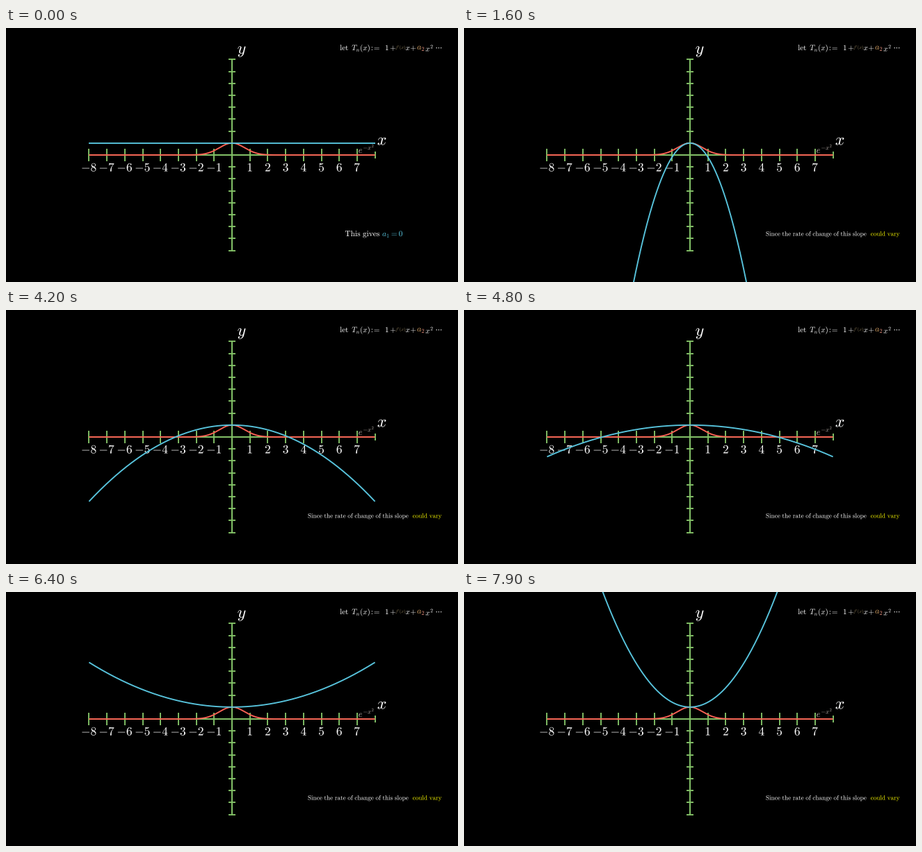
Recreate the animation shown at these times as a matplotlib script. Size 650 px wide and 366 px high, loop 8000 ms.

```python
import numpy as np
import matplotlib.pyplot as plt
from matplotlib.animation import FuncAnimation
from matplotlib.colors import to_rgb
from matplotlib.patches import PathPatch
from matplotlib.path import Path
from matplotlib.textpath import TextPath
from matplotlib.transforms import Affine2D

plt.rcParams["mathtext.fontset"] = "cm"

W, H, DPI = 650, 366, 100
STEP, FRAMES = 100, 80
PT = 72 / DPI
CX, CY, UX, UY = 325, 183, 25.7, 17.2

GREEN, RED, BLUE = "#83C167", "#FC6255", "#58C4DD"
WHITE, YELLOW = "#FFFFFF", "#FFFF00"

fig = plt.figure(figsize=(W / DPI, H / DPI), dpi=DPI, facecolor="black")
ax = fig.add_axes([0, 0, 1, 1])
ax.set_xlim(0, W)
ax.set_ylim(H, 0)
ax.axis("off")


def line(x, y, color, width=1.9, z=1):
    return ax.plot(x, y, color=color, lw=width * PT, zorder=z,
                   solid_capstyle="butt", solid_joinstyle="round")[0]


def glyphs(tex, size, x, base, center=False):
    """Outline of a formula with its ink starting (or centred) at x."""
    path = TextPath((0, 0), f"${tex}$", size=size)
    box = path.get_extents()
    anchor = (box.x0 + box.x1) / 2 if center else box.x0
    return path.transformed(Affine2D().translate(-anchor, 0).scale(1, -1).translate(x, base))


def write(tex, size, x, base, color=WHITE, center=False):
    ax.add_patch(PathPatch(glyphs(tex, size, x, base, center), fc=color, lw=0, zorder=2))


# Axes
def draw_axes():
    line([CX - 8 * UX, CX + 8 * UX], [CY, CY], GREEN, 2)
    line([CX, CX], [CY - 8 * UY, CY + 8 * UY], GREEN, 2)
    for n in range(-8, 9):
        x, y = CX + n * UX, CY + n * UY
        half = 5 if n == 8 else 9
        line([x, x], [CY - half, CY + half], GREEN)
        line([CX - 4.8, CX + 4.8], [y, y], GREEN)
        if n and n < 8:
            write(str(n), 17.5, x, 206.5, center=True)
    write("x", 24, 534.5, 168.5)
    write("y", 24, 333.3, 37)


def draw_formula():
    write(r"\mathrm{let}", 11, 480.5, 32)
    write("T_n(x)", 11, 497.5, 32)
    write(":", 11, 525.8, 32)
    write("=", 11, 529.5, 32)
    write("1", 11, 546, 32)
    write("+", 11, 552.8, 32)
    write("f'(x)", 6.5, 560.5, 30, "#8C7C58")
    write("x", 11, 575, 32)
    write("+", 11, 582, 32)
    write("a", 12, 591.5, 31, "#D9A566")
    write("2", 8.5, 597.8, 33, "#EE9482")
    write("x^2", 11, 603.5, 33.5)
    write(r"\cdots", 11, 618.5, 31.5)


draw_axes()
draw_formula()
write("e^{-x^2}", 12.5, 507.3, 180, "#C4BAB4")

xs = np.linspace(-8, 8, 401)
px = CX + UX * xs
line(px, CY - UY * np.exp(-xs ** 2), RED, z=3)
curve = line(px, CY - UY + 0 * xs, BLUE, z=4)


# Motion
def smooth(t):
    t = np.clip(t, 0, 1)
    sig = lambda v: 1 / (1 + np.exp(-v))
    low = sig(-5)
    return float(np.clip((sig(10 * (t - 0.5)) - low) / (1 - 2 * low), 0, 1))


BENDS = [0, -2, -0.1, 0, 0.1, 1]
TEXT_START, BEND_START, PERIOD, RUN = 66, 1066, 1600, 1000


def bend(ms):
    a = BENDS[0]
    for i, (old, new) in enumerate(zip(BENDS, BENDS[1:])):
        a += (new - old) * smooth((ms - BEND_START - i * PERIOD) / RUN)
    return a


# Caption morph
def resample(poly, n=80):
    dist = np.r_[0, np.cumsum(np.hypot(*np.diff(poly, axis=0).T))]
    u = np.linspace(0, dist[-1], n)
    return np.c_[np.interp(u, dist, poly[:, 0]), np.interp(u, dist, poly[:, 1])]


def split(path):
    """Group contours that overlap horizontally into single letters."""
    letters, right = [], -1
    for poly in path.to_polygons(Affine2D().scale(10)):
        poly = resample(np.asarray(poly) / 10)
        lo, hi = poly[:, 0].min(), poly[:, 0].max()
        if letters and (lo + hi) / 2 < right:
            letters[-1].append(poly)
        else:
            letters.append([poly])
            right = hi
        right = max(right, hi)
    return letters


def pad(letter, n):
    dot = np.tile(letter[0].mean(axis=0), (len(letter[0]), 1))
    return np.array(letter + [dot] * (n - len(letter)))


class Morph:
    def __init__(self, start, end, c0, c1):
        src, dst = split(start), split(end)
        self.c0, self.c1 = np.array(to_rgb(c0)), np.array(to_rgb(c1))
        self.parts, used = [], set()
        for k, letter in enumerate(dst):
            j = k * len(src) // len(dst)
            n = max(len(src[j]), len(letter))
            patch = ax.add_patch(PathPatch(Path([(0, 0)]), lw=0, zorder=2))
            self.parts.append((patch, pad(src[j], n), pad(letter, n), j in used))
            used.add(j)

    def update(self, s):
        color = np.clip(self.c0 + (self.c1 - self.c0) * s, 0, 1)
        for patch, a, b, copy in self.parts:
            loops = [Path(p, closed=True) for p in a + (b - a) * s]
            patch.set_path(Path.make_compound_path(*loops))
            patch.set_facecolor((*color, s if copy else 1))


captions = [
    Morph(glyphs(r"\mathrm{This\ gives}", 11.4, 487.8, 300),
          glyphs(r"\mathrm{Since\ the\ rate\ of\ change\ of\ this\ slope}", 9.15, 434.5, 299.5),
          WHITE, WHITE),
    Morph(glyphs("a_1=0", 11.4, 541.5, 300),
          glyphs(r"\mathrm{could\ vary}", 9.15, 585, 299.5),
          BLUE, YELLOW),
]


def update(i):
    ms = i * STEP
    curve.set_ydata(CY - UY * (1 + bend(ms) * xs ** 2))
    for caption in captions:
        caption.update(smooth((ms - TEXT_START) / RUN))
    return []


anim = FuncAnimation(fig, update, frames=FRAMES, interval=STEP, repeat=True, repeat_delay=0)
plt.show()
```
